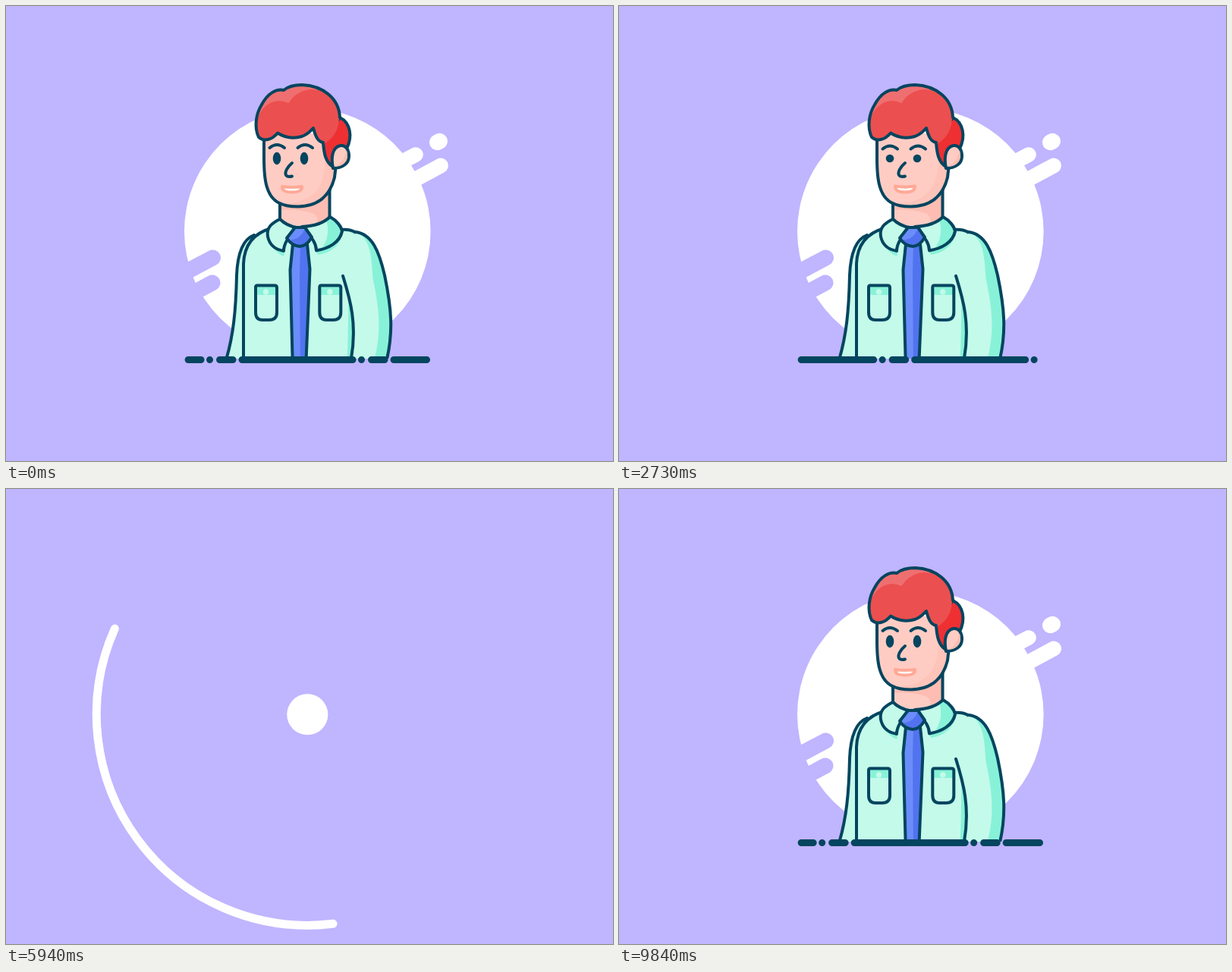
Recreate the animation shown at these times as an HTML page. Size 800 by 600 pixels, loop 9.87 s.

```html
<!DOCTYPE html>
<html>
<head>
<meta charset="utf-8">
<title>Office greeter</title>
<style>
html, body { margin: 0; height: 100%; overflow: hidden; background: #c0b5ff; }
svg { display: block; width: 100vw; height: 100vh; }
.o { stroke: #04455f; stroke-width: 4; stroke-linecap: round; stroke-linejoin: round; }
.n { fill: none; }
.skin { fill: #ffccc4; } .skin2 { fill: #fdbdb2; }
.shirt { fill: #c4faea; } .shirt2 { fill: #88f2d8; }
.tie { fill: #6b8dfb; } .tie2 { fill: #5273ef; }
.white { stroke: #fff; stroke-linecap: round; }
.cut { stroke: #c0b5ff; stroke-linecap: round; stroke-width: 21; }
</style>
</head>
<body>
<svg viewBox="0 0 800 600">
  <defs>
    <path id="faceShape" d="M340 168V200C340 218 341 230 344 239C350 259 364 264.500 385 264.500C412 264 427 250 433 226L436 200V168"/>
    <path id="neckShape" d="M361 250V281Q372 290 388 290Q415 290 427 278V240"/>
    <path id="wing" d="M427 278C436 283 442 291 443 297C440 312 425 320 409 322.500C409 314 405 307 390 291Q415 290 427 278Z"/>
    <path id="tieShape" d="M378 314L374.500 348L378 480H395L400.500 347L397 314Z"/>
    <path id="knot" d="M381 292H394L403 305Q396 317 387 317Q376 316 370 306Z"/>
    <path id="backHair" d="M440 147C454 154 457 172 449 188L431 212C421 206 419 194 418 180Z"/>
    <path id="hair" d="M440 147C439 122 418 105 390 104C380 104 372 106 366 111C356 109 345 115 337 130C329 143 327 160 333 173C340 179 350 177 358 167.500C368 174 379 175 390 172C398 169 400 166 405 161C408 172 411 179 418 180"/>
    <clipPath id="above"><path d="M0 0H800V465H0Z"/></clipPath>
    <clipPath id="faceClip"><use href="#faceShape"/></clipPath>
    <clipPath id="neckClip"><use href="#neckShape"/></clipPath>
    <clipPath id="wingClip"><use href="#wing"/></clipPath>
    <clipPath id="hairClip"><use href="#hair"/><use href="#backHair"/></clipPath>
  </defs>

  <path id="ring" class="white n" stroke-width="11"/>
  <g id="streaks" class="white">
    <path d="M568.500 179.800L571.500 178.200" stroke-width="21"/>
    <path d="M515 209L540 196" stroke-width="19.500"/>
    <path d="M535 231L573 210.500" stroke-width="20"/>
  </g>
  <circle id="disc" cx="397.300" cy="297.300" fill="#fff"/>
  <path id="cuts" class="cut" d="M198 371.500L272.500 332M198 404.500L272 365"/>

  <g clip-path="url(#above)">
  <g id="body">
    <path class="o shirt" d="M327 302C311 308 305 330 304 355C303 400 300 435 289 470H315V330Z"/>
    <path class="o shirt" d="M350 293C328 299 314 314 313 340V480H478V340L460 298Q452 294 441 295Z"/>
    <path class="shirt2" d="M451 350H476V480H449Q452 420 451 350Z"/>
    <g id="pocket">
      <path class="shirt2" d="M329 369H357V381H329Z"/><circle class="shirt" cx="342.500" cy="377" r="3.700"/>
      <path class="o n" d="M331 368.500H354Q357 368.500 357 371.500V404Q357 414 347 414H338Q329 414 329 404V371Q329 368.500 331 368.500Z"/>
    </g>
    <use href="#pocket" x="84.300"/>
    <path class="shirt2" d="M348 312Q354 325 366 330L371 311ZM405 311L411 328Q432 325 441 308Z"/>
    <g id="tie">
      <use href="#tieShape" class="tie"/>
      <path class="tie2" d="M388 314L387 350L388 480H395L400.500 347L397 314Z"/>
      <use href="#tieShape" class="o n"/>
    </g>
    <g id="neck">
      <use href="#neckShape" class="skin"/>
      <path class="skin2" clip-path="url(#neckClip)" d="M361 240H430V300H404Q416 282 406 274Q385 267 361 269Z"/>
      <path class="o n" d="M361 255V281M426.500 240V278"/>
    </g>
    <path class="o shirt" d="M361 281C349 287 343 293 345 304C347 314 354 321 366 323C366 314 371 306 383 292Q370 290 361 281Z"/>
    <use href="#wing" class="shirt"/>
    <path class="shirt2" clip-path="url(#wingClip)" d="M420 275C428 297 424 311 412 325H450V275Z"/>
    <use href="#wing" class="o n"/>
    <use href="#knot" class="tie"/>
    <path class="tie2" d="M394 292L403 305Q396 317 387 317Q377 316 372 309Q390 308 394 292Z"/>
    <use href="#knot" class="o n"/>

    <g id="head">
      <use href="#faceShape" class="skin"/>
      <path class="skin2" opacity=".55" clip-path="url(#faceClip)" d="M416 160C422 195 424 222 410 243Q396 259 366 261V270H440V160Z"/>
      <use href="#faceShape" class="o n"/>
      <use href="#backHair" class="o" fill="#ee3033"/>
      <use href="#hair" fill="#ef6f70"/>
      <g fill="#ec4f4f" clip-path="url(#hairClip)">
        <ellipse cx="360" cy="160" rx="30" ry="35"/><ellipse cx="403" cy="148" rx="36" ry="38"/>
      </g>
      <use href="#hair" class="o n"/>
      <path class="o skin" d="M431 214C428 200 430 186 441 184C448 183 452 190 452 198C452 208 443 214 431 214Z"/>
      <path class="skin2" d="M449 190C452 204 445 211 435 211.500Q446 205 449 190Z"/>
      <path id="brows" class="o n" d="M347.500 187Q357 179 367 187M384.500 187Q394 179 404 187"/>
      <ellipse class="eye" cx="357" cy="201" fill="#04455f"/>
      <ellipse class="eye" cx="393" cy="201" fill="#04455f"/>
      <path class="o n" d="M377 207C371 212 367 219 369 223Q371 226 377 224.500"/>
      <path id="mouth" fill="#fff" stroke="#ffa997" stroke-width="4" stroke-linejoin="round"/>
    </g>
    <g id="hand">
      <path class="o skin" d="M272 316L249 284C241 275 239 265 248 263C256 260 264 262 267 270C269 264 275 266 279 271C285 279 290 288 290 299L292 307Z"/>
      <path class="skin2" d="M270 307L250 281Q245 275 245 270Q263 285 277 306Z"/>
      <path class="o n" d="M267 270C267 278 269 283 275 286"/>
    </g>
    <path id="sleeve" class="shirt"/>
    <path id="sleeveShade" class="shirt2"/>
    <path id="sleeveLine" class="o n"/>
  </g>
  </g>
  <path id="ground" class="n" stroke="#04455f" stroke-width="9" stroke-linecap="round"/>
</svg>
<script>
const LOOP = 9870, CX = 397.3, CY = 297.3;
const $ = id => document.getElementById(id);
const set = (id, attrs) => { for (const k in attrs) $(id).setAttribute(k, attrs[k]); };

// Eased value through [time, value] pairs.
function track(t, ...keys) {
  let [t0, v0] = keys[0];
  if (t <= t0) return v0;
  for (const [t1, v1] of keys) {
    if (t < t1) {
      const u = (t - t0) / (t1 - t0);
      return v0 + (v1 - v0) * u * u * (3 - 2 * u);
    }
    t0 = t1; v0 = v1;
  }
  return v0;
}

// Sleeve edges, hanging and across the chest; swing pushes the elbow out between.
const OUTER = {
  down: [[460,298], [483,300], [492,325], [499,355], [508,398], [511,430], [501,470]],
  up: [[460,297], [478,300], [490,315], [487,331], [482,385], [370,412], [264,318]],
  swing: [38, 45] };
const INNER = {
  down: [[444,356], [453,385], [464,420], [454,470]],
  up: [[439,325], [390,326], [340,322], [297,291]],
  swing: [25, 10] };

const edge = ({ down, up, swing }, a) => down.map((p, i) => p.map((v, k) =>
  v + (up[i][k] - v) * a + (i ? swing[k] * Math.sin(Math.PI * a) : 0)));

// Moves an edge inwards, tapering to nothing at the shoulder.
const inset = (pts, width) => pts.map(([x, y], i) => {
  const p = pts[Math.max(i - 1, 0)], q = pts[Math.min(i + 1, pts.length - 1)];
  const dx = q[0] - p[0], dy = q[1] - p[1];
  const w = width * Math.min(1, i / 3) / Math.hypot(dx, dy);
  return [x - dy * w, y + dx * w];
});

const curve = ([first, ...rest], start = 'M') => `${start}${first}C${rest.join(' ')}`;
const back = pts => curve([...pts].reverse(), 'L');

function drawArm(t) {
  const a = track(t, [150, 0], [880, 1], [1580, 1], [2220, 0]);
  const outer = edge(OUTER, a), inner = edge(INNER, a);
  const line = curve(outer) + back(inner);
  set('sleeve', { d: line + 'Z' });
  set('sleeveLine', { d: line });
  set('sleeveShade', { d: curve(outer) + back(inset(outer, 16)) + 'Z' });

  const [ox, oy] = outer.at(-1), [ix, iy] = inner.at(-1);
  const wave = track(t, [750, 0], [880, 6], [1450, 6], [1560, 0]) * Math.sin((t - 800) / 60);
  const angle = Math.atan2(oy - iy, ox - ix) * 180 / Math.PI - 140.7 + wave;
  set('hand', { transform:
    `translate(${(ox + ix) / 2 - 280.5} ${(oy + iy) / 2 - 304.5}) rotate(${angle} 280.5 304.5)` });
}

function drawFace(t) {
  const ry = track(t, [60, 8.3], [420, 5.3], [3100, 5.3], [3300, 1.2], [3500, 5.3],
    [7300, 5.3], [7700, 4], [8300, 4], [9000, 8.3]);
  for (const eye of document.querySelectorAll('.eye')) {
    eye.setAttribute('rx', 5.3);
    eye.setAttribute('ry', ry);
  }
  set('brows', { transform: `translate(0 ${track(t, [60, 0], [420, 1.5], [7300, 1.5], [7700, 0])})` });
  const smile = track(t, [100, 0], [700, .4], [1700, .4], [2600, .1],
    [7000, .1], [7500, 1], [8300, 1], [9000, 0]);
  const top = 238 - 4.5 * smile, low = 245.5, dip = top + 2 + 2 * smile, pinch = 3 * smile;
  set('mouth', { d: `M364 ${top}Q377 ${dip} 390 ${top}Q${391 - pinch} ${low} 377 ${low}Q${363 + pinch} ${low} 364 ${top}Z` });
}

function drawBody(t) {
  const p = track(t, [4003, 0], [4810, 1], [6810, 1], [7370, 0]);
  const dx = -15.5 * (1 - (1 - p) ** 8);
  set('body', { transform: `translate(${dx} ${380 * p}) rotate(${-13.4 * p ** .7} 387 303)` });
  const tilt = track(t, [200, 0], [850, 9], [1700, 9], [2600, 0]) - 42 * p ** .76;
  set('head', { transform: `rotate(${tilt} 404 245)` });
  set('neck', { transform: `translate(0 278) skewX(${-.4 * tilt}) translate(0 -278)` });
  const sway = track(t, [7200, 0], [7500, -1.5], [7880, 1.6], [8300, -.6], [8700, 0]);
  set('tie', { transform: `rotate(${sway} 387 312)` });
}

// Shift of the streaks along their slope: slide in, then ring out like a spring.
const HIDDEN = -63;
function slide(t) {
  if (t < 6912) return track(t, [4300, 0], [4620, HIDDEN]);
  const s = t - 7162;
  return 21.5 * Math.exp(-.0043 * s) * Math.cos(s * Math.PI / 250);
}

function shift(id, x) {
  set(id, { transform: `translate(${x} ${-.54 * x})`, display: x <= HIDDEN ? 'none' : 'inline' });
}

function drawBackdrop(t) {
  set('disc', { r: track(t, [4470, 162.3], [4790, 177], [5270, 0], [5700, 0], [6630, 162.3]) });
  shift('streaks', slide(t));
  shift('cuts', slide(t + 33));

  const span = track(t, [5700, 0], [5935, 121], [6700, 130], [6860, 0]);
  const radius = track(t, [5700, 262], [5940, 278], [6250, 283], [6705, 241], [6860, 162]);
  const head = 203.4 + .63 * (t - 5940);
  const at = deg => {
    const a = deg * Math.PI / 180;
    return `${CX + radius * Math.cos(a)} ${CY + radius * Math.sin(a)}`;
  };
  set('ring', { d: span > .5 ? `M${at(head - span)}A${radius} ${radius} 0 0 1 ${at(head)}` : '' });
}

// Dot, short dash and long dash repeat every 200 and drift to the right.
function drawGround(t) {
  const half = track(t, [4500, 161.7], [4880, 0], [6640, 0], [6900, 161.7]);
  const first = 268.5 + .0288 * (t < 5500 ? t : t - LOOP);
  let d = '';
  for (let x = first - 400; x < 600; x += 200)
    for (const [from, to] of [[-4.5, 4.5], [8.5, 35], [38, 193]]) {
      const a = Math.max(x + from, CX - half) + 4.5, b = Math.min(x + to, CX + half) - 4.5;
      if (b >= a - .01) d += `M${a} 466.5H${b + .01}`;
    }
  set('ground', { d });
}

function frame(now) {
  const t = now % LOOP;
  drawBackdrop(t);
  drawBody(t);
  drawFace(t);
  drawArm(t);
  drawGround(t);
  requestAnimationFrame(frame);
}
requestAnimationFrame(frame);
</script>
</body>
</html>
```
